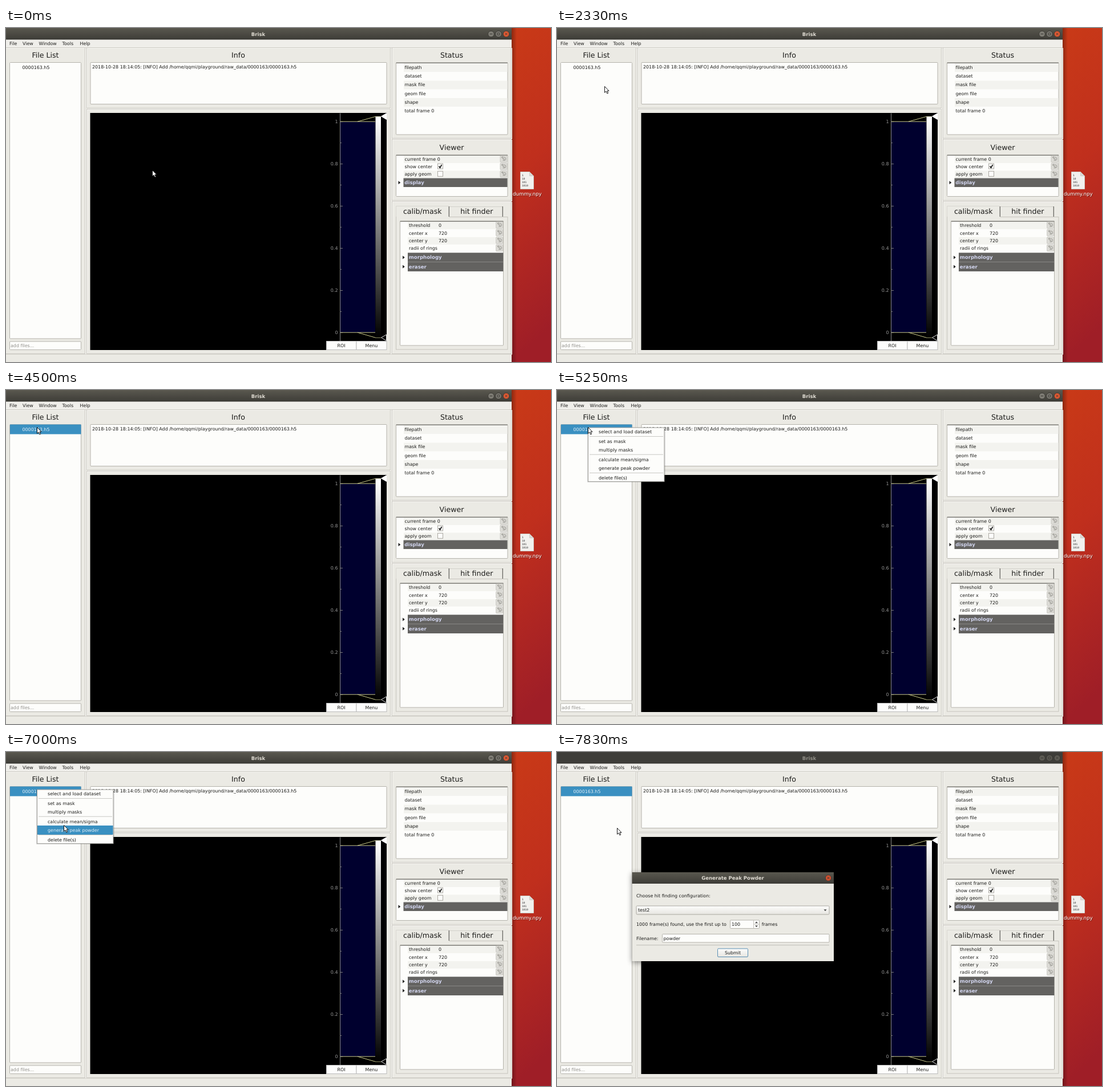
Write an HTML page that moves like this. It is 955 px wide and 586 px high and loops after 8000 ms.

```html
<!DOCTYPE html>
<html lang="en">
<head>
<meta charset="utf-8">
<title>Viewer session</title>
<style>
  html, body { margin: 0; width: 100%; height: 100%; overflow: hidden; background: #ebeae4; }
  svg { display: block; width: 955px; height: 586px; }
  text { font: 7.95px "DejaVu Sans", sans-serif; fill: #1c1c1a; text-rendering: geometricPrecision; white-space: pre; }
  .head { font-size: 12.6px; text-anchor: middle; }
  .mid { text-anchor: middle; }
  .axis { font-size: 8px; fill: #969696; text-anchor: end; }
  .bar { font-size: 8.5px; font-weight: bold; fill: #e0dcd3; text-anchor: middle; }
  .group { font-size: 8.6px; font-weight: bold; fill: #d2d5ee; }
  .hint { fill: #92918d; }
  .icon { font-size: 8.7px; fill: #fff; text-anchor: middle; }
  .bits { font: bold 4.6px "DejaVu Sans Mono", monospace; fill: #666; }
  .lit { fill: #e4eff6; }
  .blur .bar { fill: #918f87; }
  .blur .strip { fill: #3e3d39; }
  .blur .knob { fill: #5c5a53; }
  #dialog { filter: drop-shadow(0 2px 5px rgba(0, 0, 0, .45)); }
</style>
</head>
<body>
<svg id="stage" viewBox="0 0 955 586">
  <defs>
    <linearGradient id="wall" x1="0" y1="0" x2="0.12" y2="1">
      <stop offset="0" stop-color="#c93a17"/><stop offset=".45" stop-color="#c02f1d"/>
      <stop offset="1" stop-color="#9f1e27"/>
    </linearGradient>
    <linearGradient id="edge"><stop stop-color="#000" stop-opacity=".3"/><stop offset="1" stop-color="#000" stop-opacity="0"/></linearGradient>
    <linearGradient id="strip" x2="0" y2="1"><stop stop-color="#5a584f"/><stop offset="1" stop-color="#3d3c37"/></linearGradient>
    <linearGradient id="ramp" x2="0" y2="1"><stop stop-color="#fff"/><stop offset="1" stop-color="#000"/></linearGradient>
    <linearGradient id="button" x2="0" y2="1"><stop stop-color="#fdfdfc"/><stop offset="1" stop-color="#e6e5e0"/></linearGradient>
  </defs>
</svg>
<script>
const LOOP = 8000;
const WHITE = '#fdfdfb', PANEL = '#ebeae4', EDGE = '#b5b3ac', SHADE = '#f3f3ef', DARK = '#636260', BLUE = '#3a90c1';

// Drawing helpers: text is placed by its vertical middle.
const rect = (x, y, x2, y2, fill, stroke, more = '') =>
  `<rect x="${x}" y="${y}" width="${x2 - x}" height="${y2 - y}" fill="${fill}"${stroke ? ` stroke="${stroke}"` : ''} ${more}/>`;
const path = (d, stroke, fill = 'none', width = 1) =>
  `<path d="${d}" fill="${fill}" stroke="${stroke}" stroke-width="${width}"/>`;
const text = (x, mid, s, cls = '') =>
  `<text x="${x}" y="${mid + (cls === 'head' ? 4.4 : 2.9)}" class="${cls}">${s}</text>`;
const group = (id, body) => `<g id="${id}">${body}</g>`;
const list = (items, fn) => items.map(fn).join('');

const frame = (x, y, x2, y2) =>
  rect(x + .5, y + .5, x2 + .5, y2 + .5, 'none', '#f8f7f4') + rect(x - .5, y - .5, x2 - .5, y2 - .5, 'none', '#cbc9c2');
const field = (x, y, x2, y2) => rect(x, y, x2, y2, WHITE, EDGE, 'rx="1"');
const tree = (x, y, x2, y2) => field(x, y, x2, y2) + path(`M${x} ${y + .3}H${x2}`, '#85847f', 'none', 1.5);
const knob = (x, y, r, fill, glyph) =>
  `<circle class="knob" cx="${x}" cy="${y}" r="${r}" fill="${fill}" stroke="#34332f" stroke-width=".8"/>` + path(glyph, '#3a3935');
const cross = (x, y) => `M${x - 1.8} ${y - 1.8}l3.6 3.6m0 -3.6l-3.6 3.6`;
const reset = (x, y) => rect(x, y, x + 12, y + 11.5, '#dddcd7', '#c2c0ba', 'stroke-width=".8" rx="1"') +
  path(`M${x + 2.5} ${y + 3}h5q2.3 0 2.3 2.6t-2.3 2.6h-3M${x + 4.5} ${y + 1.4}l-2 1.6l2 1.8M${x + 4} ${y + 5.5}h3v3`, '#96958f', 'none', 1);
const check = (y, on) => rect(756.5, y, 765.5, y + 9, WHITE, '#a9a7a1') +
  (on ? path(`M758.5 ${y + 4.5}l2 2.7l3 -5.4`, '#111', 'none', 1.7) : '');
const folder = (x, y, x2, y2, name) => rect(x, y, x2, y2, DARK) +
  path(`M${x - 9} ${(y + y2) / 2 - 3}l3.8 3l-3.8 3z`, 'none', '#222') + text(x + 1.8, (y + y2) / 2, name, 'group');

function desktop() {
  return rect(880, 0, 955, 586, 'url(#wall)') + rect(886, 0, 895, 586, 'url(#edge)') +
    path('M901.5 252.5H917.5L924.5 259.5V282.5H901.5Z', '#cfcdc8', '#f2f1ee') +
    path('M917.5 252.5V259.5H924.5Z', '#c4c2bc', '#dcdad5', .7) +
    list(['1', '10', '101', '1010'], (s, i) => `<text class="bits" x="904" y="${260 + i * 5.9}">${s}</text>`) +
    `<text class="icon" x="914" y="295" fill-opacity=".4" style="fill:#000">dummy.npy</text>` +
    text(913.3, 290.7, 'dummy.npy', 'icon');
}

function titleBar() {
  return group('title', rect(0, 0, 886, 20.5, 'url(#strip)', '', 'class="strip"') + path('M0 20H886', '#33322e') +
    text(442, 10.7, 'Brisk', 'bar') +
    knob(850, 10.5, 5.3, '#7d7b73', 'M847.8 10.5h4.4') +
    knob(863, 10.5, 5.3, '#7d7b73', 'M861 8.7h4v3.6h-4z') +
    knob(876.5, 10.5, 5.3, '#dc5832', cross(876.5, 10.5)));
}

function histogram() {
  const ys = [164, 238, 312, 386, 460, 534];
  const line = '#c9c98c';
  return rect(147.5, 149, 667, 565, '#000') + rect(586, 164, 647, 534, '#00002e') +
    path('M585.5 149.5V549', '#8c8c8c') +
    list(ys, (y, i) => path(`M585 ${y + .5}h5` + (i < 5 ? `M585 ${y + 37.5}h3` : ''), '#777') +
      text(581.5, y + .3, ['1', '0.8', '0.6', '0.4', '0.2', '0'][i], 'axis')) +
    path('M586 164.2H647M616 164.2L647 155.5H657M586 534.2H647M616 534.2L647 543.2H657', line) +
    rect(647.5, 155.5, 657, 543, 'url(#ramp)') +
    path('M657.5 155L666.5 149.8V160.4Z', '#fff', '#fff') +
    path('M657.5 543.2L666.5 538V548.6Z', '#ddd', '#000') +
    rect(561.5, 549.5, 614, 564.5, '#fdfdfc', '#bbb') + rect(614, 549.5, 667, 564.5, '#fdfdfc', '#bbb') +
    text(587.5, 557.2, 'ROI', 'mid') + text(640.5, 557.2, 'Menu', 'mid');
}

function sidePanels() {
  const status = ['filepath', 'dataset', 'mask file', 'geom file', 'shape', 'total frame 0'];
  const view = ['current frame 0', 'show center', 'apply geom'];
  const calib = [['threshold', '0'], ['center x', '720'], ['center y', '720'], ['radii of rings', '']];
  return frame(677, 35, 886, 194) + text(781, 48, 'Status', 'head') + tree(683.5, 61, 879, 187) +
    list(status, (s, i) => (i % 2 ? '' : rect(697, 62 + i * 15.25, 878.5, 77 + i * 15.25, SHADE)) + text(698.5, 69 + i * 15.25, s)) +
    frame(677, 196, 886, 303) + text(781, 210, 'Viewer', 'head') + tree(683.5, 223, 879, 295.5) +
    list(view, (s, i) => (i % 2 ? '' : rect(697, 224 + i * 13.2, 878.5, 237 + i * 13.2, SHADE)) +
      text(698.5, 230 + i * 13.2, s) + reset(866, 224 + i * 13.2)) +
    check(238, true) + check(251.3, false) + folder(696.5, 263.5, 878.5, 279, 'display') +
    frame(677, 305, 886, 572) +
    rect(683.5, 331.5, 879, 564, 'none', '#c6c4bd') + path('M684 331.5H776', PANEL) +
    path('M683.5 331V312.5H776', '#d9d7d1') + path('M777 313.5H870', '#d3d1cb') +
    path('M776.3 313V331M870.3 313V331', '#5c5b57', 'none', 1.2) +
    text(729.8, 321.2, 'calib/mask', 'head') + text(824.8, 321.2, 'hit finder', 'head') +
    tree(690.5, 339, 871.5, 557) +
    list(calib, ([s, v], i) => (i % 2 ? '' : rect(704, 340 + i * 13.4, 871, 353 + i * 13.4, SHADE)) +
      text(706, 346.2 + i * 13.4, s) + text(758, 346.2 + i * 13.4, v) + reset(858.7, 340 + i * 13.4)) +
    folder(704, 394.3, 871.3, 410.5, 'morphology') + folder(704, 410.5, 871.3, 427, 'eraser');
}

function mainWindow() {
  const menus = [[6, 'File'], [29, 'View'], [57.5, 'Window'], [98.5, 'Tools'], [129.5, 'Help']];
  return rect(0, 0, 886, 586, PANEL) + titleBar() + rect(0, 20.5, 886, 34, '#efeeea') +
    list(menus, ([x, s]) => text(x, 27.2, s)) + path('M0 34.5H886', '#d2d0ca') +
    frame(-2, 35, 139, 572) + text(69, 48, 'File List', 'head') + field(6.5, 60.5, 131.5, 545) +
    group('row', rect(7, 60.5, 131.5, 77.5, BLUE)) +
    `<text id="file" x="28.5" y="72.3">0000163.h5</text>` +
    field(6.5, 550, 131.5, 564.5) + text(8, 557.2, 'add files...', 'hint') +
    frame(142, 35, 674, 141) + text(407, 48, 'Info', 'head') + field(148, 60.5, 667, 133.5) +
    text(151, 68.2, '2018-10-28 18:14:05: [INFO] Add /home/qqmi/playground/raw_data/0000163/0000163.h5') +
    frame(142, 143, 674, 572) + histogram() + sidePanels() + path('M0 572.5H886', '#d6d4ce');
}

const ITEMS = [['select and load dataset', 66.5, 81], ['set as mask', 82, 97.3], ['multiply masks', 97.3, 112.7],
  ['calculate mean/sigma', 114, 129], ['generate peak powder', 129, 145], ['delete file(s)', 146, 160.5]];
const ITEM_MIDS = [73.3, 90, 105.3, 122, 137.3, 153.7];

function contextMenu() {
  return group('menu', rect(53, 66, 190, 162, '#000', '', 'opacity=".12"') +
    rect(54.5, 66, 188, 160.7, WHITE, '#9c9b97') +
    path('M57 81.5H186M57 113.2H186M57 145.5H186', '#c9c8c4') +
    rect(55, 0, 187.5, 15, BLUE, '', 'id="hover"') +
    list(ITEMS, ([s], i) => text(73, ITEM_MIDS[i], s)));
}

function dialog() {
  const arrow = (x, y, h) => path(`M${x - 2.5} ${y}h5l-2.5 ${h}z`, 'none', '#444');
  return group('dialog', rect(131.5, 211, 485, 367, PANEL) + rect(131.5, 211, 485, 231, 'url(#strip)') +
    text(308, 221.2, 'Generate Peak Powder', 'bar') + knob(475.5, 221, 5.2, '#cf5030', cross(475.5, 221)) +
    text(139, 252, 'Choose hit finding configuration:') +
    rect(139, 270, 477, 285, 'url(#button)', '#aaa8a1', 'rx="1.5"') + text(142, 277.5, 'test2') + arrow(470, 276.2, 3) +
    text(139, 302.2, '1000') + text(162, 302.2, 'frame(s) found, use the first up to') +
    field(303.5, 295, 354.5, 309.5) + path('M344.5 295V309.5M344.5 302.2H354.5', '#c5c3bd') +
    text(306, 302.2, '100') + arrow(349.5, 300.2, -2.6) + arrow(349.5, 304.6, 2.6) + text(358.7, 302.2, 'frames') +
    text(139, 327, 'Filename:') + field(184.5, 319.5, 477, 334) + text(186.5, 327, 'powder') +
    path('M139 338.8H477', '#bdbbb4') +
    rect(281.5, 345, 334.5, 359.5, 'url(#button)', '#5a8fb4', 'rx="1.5"') + text(308, 352.2, 'Submit', 'mid'));
}

const cursor = group('cursor', path('M.5 .5V11.3L3 9L4.9 13L6.7 12.2L4.9 8.3H8Z', '#000', '#fff', .9));

const $ = id => document.getElementById(id);
$('stage').innerHTML += desktop() + mainWindow() + contextMenu() + dialog() + cursor;

// Each entry: start time in ms, then the value held until the next entry.
const POINTER = [[0, 256, 249], [1420, 237, 238], [1670, 213, 216], [1750, 178, 186], [1830, 149, 160],
  [2000, 130, 140], [2080, 115, 126], [2330, 83, 102], [2500, 66, 84], [2580, 51, 67], [2670, 39, 55], [2750, 31, 47],
  [2920, 25, 38], [3000, 22, 34], [3170, 20, 31], [3330, 16, 28], [3420, 14, 26], [3830, 17, 29], [3920, 20, 32],
  [4170, 40, 52], [4250, 54, 65], [6080, 56, 67], [6250, 63, 75], [6330, 73, 84], [6420, 82, 94], [6500, 89, 101],
  [6670, 93, 108], [6750, 96, 115], [6830, 98, 121], [7000, 101, 128], [7170, 102, 130], [7250, 104, 132], [7330, 105, 133]];
const HOVER = [[0, -1], [6080, 0], [6330, 1], [6420, 1], [6500, 2], [6750, 3], [7000, 4]];

const at = (track, t) => track.findLast(k => k[0] <= t);
const show = (id, on) => { $(id).style.display = on ? '' : 'none'; };
const labels = [...$('menu').querySelectorAll('text')];

function draw(t) {
  const [, x, y] = at(POINTER, t);
  $('cursor').setAttribute('transform', `translate(${x} ${y})`);

  const selected = t >= 4500;
  show('row', selected);
  $('file').setAttribute('class', selected ? 'lit' : '');

  const hot = at(HOVER, t)[1];
  show('menu', t >= 5250 && t < 7670);
  show('hover', hot >= 0);
  if (hot >= 0) {
    const [, top, bottom] = ITEMS[hot];
    $('hover').setAttribute('y', top);
    $('hover').setAttribute('height', bottom - top);
  }
  labels.forEach((el, i) => el.setAttribute('class', i === hot ? 'lit' : ''));

  const opening = t < 7830;
  $('title').setAttribute('class', t >= 7750 ? 'blur' : '');
  show('dialog', t >= 7750);
  $('dialog').setAttribute('opacity', opening ? .33 : 1);
  $('dialog').setAttribute('transform', opening ? 'translate(0 289) scale(1 .41) translate(0 -289)' : '');
}

const start = performance.now();
function tick() {
  draw((performance.now() - start) % LOOP);
  requestAnimationFrame(tick);
}
draw(0);
requestAnimationFrame(tick);
</script>
</body>
</html>
```
